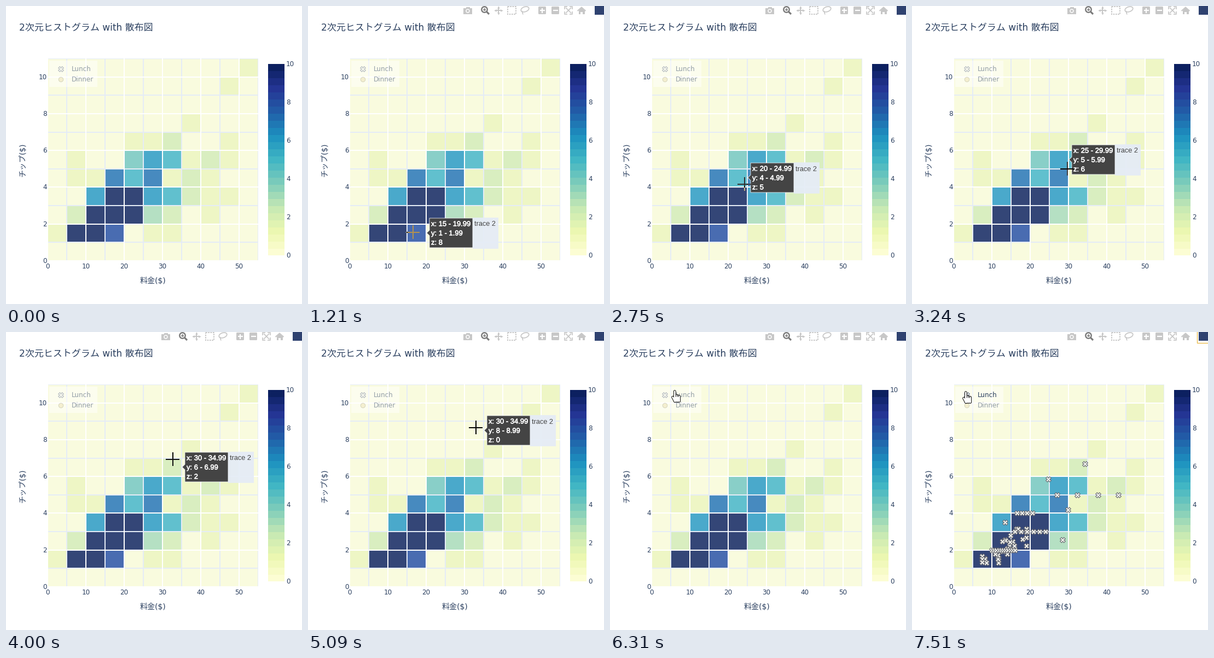
Animation, 541 px wide and 545 px high, one loop 8 s. Source, as a matplotlib script:

```python
import matplotlib.pyplot as plt
import matplotlib.patheffects as pe
import numpy as np
from matplotlib.animation import FuncAnimation
from matplotlib.colors import to_rgb
from matplotlib.patches import Circle, Ellipse, FancyBboxPatch, Polygon, Rectangle

plt.rcParams["font.family"] = ["DejaVu Sans", "Noto Sans CJK JP"]

W, H, PT = 541, 545, 0.72          # stage in pixels, points per pixel
LEFT, BOTTOM, CELL_W, CELL_H, BINS = 76, 466, 35, 370 / 11, 11
LOOP, STEP = 8000, 50
SHOW_BAR, CLICK, SHOW_POINTS = 390, 6980, 7510
INK, PANEL, PALE, DARK = "#2a3f5f", "#e5ecf6", "#c7c7c7", "#7c7c7c"

SCALE = ["#ffffd9", "#edf8b1", "#c7e9b4", "#7fcdbb", "#41b6c4",
         "#1d91c0", "#225ea8", "#253494", "#081d58"]
STOPS = np.array([to_rgb(c) for c in SCALE])

# tip bin: (first bill bin, number of visits in each bin)
VISITS = {
    1: (0, [1, 12, 22, 8, 0, 1, 1]),
    2: (1, [2, 25, 26, 17, 3, 2, 0, 1]),
    3: (2, [6, 22, 17, 6, 5, 2, 1, 1]),
    4: (1, [1, 1, 7, 5, 7, 1, 2, 1]),
    5: (1, [1, 0, 0, 4, 6, 5, 1, 2, 1]),
    6: (4, [1, 1, 2, 0, 0, 1]),
    7: (7, [1]), 9: (9, [1]), 10: (10, [1]),
}
z = np.zeros((BINS, BINS), int)
for row, (col, n) in VISITS.items():
    z[row, col:col + len(n)] = n

# pointer moves: start, end, x, y; it rests in between
START = (293, 528)
MOVES = [
    (390, 860, 188, 423), (1160, 1200, 191, 413), (1490, 2240, 230, 345),
    (2330, 2750, 245, 325), (2780, 3080, 280, 305), (3170, 3570, 303, 250),
    (3860, 4190, 306, 215), (4470, 5060, 306, 174), (5400, 5420, 315, 172),
    (5620, 6100, 166, 140), (6100, 6300, 118, 107), (6440, 6580, 98, 109),
]


def pointer(t):
    pos = np.array(START, float)
    for t0, t1, x, y in MOVES:
        pos += np.clip((t - t0) / (t1 - t0), 0, 1) * (np.array([x, y]) - pos)
    return pos


def lunch_visits():
    """Bills and tips: a noisy 16 % cloud, round tips and a few big bills."""
    rng = np.random.default_rng(4)
    bill = np.clip(rng.normal(14, 3.6, 32), 7.4, 19)
    tip = np.clip(0.16 * bill * rng.normal(1, 0.2, 32), 1.25, 3.6)
    pts = list(zip(bill, tip))
    for t, lo, hi, n in ((2, 10, 16, 11), (3, 16, 24, 6), (4, 16.5, 20.5, 4), (5, 27, 43, 4)):
        pts += [(b, t) for b in np.linspace(lo, hi, n)]
    pts += [(34.3, 6.7), (24.7, 5.85), (29.8, 4.2), (28.4, 2.56), (13.4, 3.5)]
    b, t = np.array(pts).T
    return LEFT + b * CELL_W / 5, BOTTOM - t * CELL_H


def shade(v):
    at = np.linspace(0, 1, len(STOPS))
    return np.stack([np.interp(v, at, STOPS[:, k]) for k in range(3)], axis=-1)


def edge_x(c):
    return LEFT + CELL_W * c


def edge_y(r):
    return int(round(BOTTOM - CELL_H * r))


def paint_base():
    img = np.ones((H, W, 3))
    bg = np.array(to_rgb(PANEL))
    top, low, right = edge_y(BINS), edge_y(0), edge_x(BINS)
    img[top:low, LEFT:right] = bg
    for k in range(0, BINS, 2):
        x, y = edge_x(k), edge_y(k)
        img[top:low, x - 1:x + 1] = 1
        img[y - 1:y + 1, LEFT:right] = 1
    cells = 0.8 * shade(np.clip(z / 10, 0, 1)) + 0.2 * bg
    for r in range(BINS):
        for c in range(BINS):
            img[edge_y(r + 1) + 1:edge_y(r) - 1,
                edge_x(c) + 1:edge_x(c + 1) - 1] = cells[r, c]
    img[100:148, 79:167] = 0.5 * img[100:148, 79:167] + 0.5
    bands = (np.arange(350) * 27 // 350 + 0.5) / 27
    img[106:456, 479:509] = shade(1 - bands)[:, None]
    return img


fig = plt.figure(figsize=(W / 100, H / 100), dpi=100, facecolor="white")
ax = fig.add_axes([0, 0, 1, 1])
ax.axis("off")
base = paint_base()
ax.imshow(base, extent=(0, W, H, 0), aspect="auto", interpolation="nearest")
ax.set(xlim=(0, W), ylim=(H, 0))
ax.autoscale(False)


def label(x, y, s, size=12, color=INK, **kw):
    return ax.text(x, y, s, fontsize=size * PT, color=color, **kw)


def line(xs, ys, color=PALE, lw=2.0, cap="butt", **kw):
    return ax.plot(xs, ys, color=color, lw=lw * PT, solid_capstyle=cap, **kw)[0]


def patch(p):
    return ax.add_patch(p)


def rect(x, y, w, h, color=PALE, **kw):
    return patch(Rectangle((x, y), w, h, fc=color, ec="none", **kw))


def ring(x, y, r, color, lw):
    return patch(Circle((x, y), r, fc="none", ec=color, lw=lw * PT))


def plus(x, y, r, color, lw):
    return [line([x - r, x + r], [y, y], color, lw), line([x, x], [y - r, y + r], color, lw)]


# titles, ticks, legend
label(24, 45, "2次元ヒストグラム with 散布図", 17)
label(268.5, 507, "料金($)", 14, ha="center")
label(31, 281, "チップ($)", 14, rotation=90, ha="center", va="center")
for k in range(6):
    label(edge_x(2 * k), 479.5, str(10 * k), ha="center")
    label(75, BOTTOM - 2 * k * CELL_H + 4, str(2 * k), ha="right")
    label(512, 460 - 70 * k, str(2 * k))

X_STYLE = dict(marker="X", ls="", mfc="#f2f2ee", mew=PT)
lunch_name = label(120, 119, "Lunch", alpha=0.5)
label(120, 138, "Dinner", alpha=0.5)
lunch_key, = ax.plot([100], [114.5], alpha=0.5, ms=9.5 * PT, mec="#66738a", **X_STYLE)
ax.plot([100], [133.5], "o", ms=8.5 * PT, mfc="#eee3b4", mec="#b4b49c", mew=PT, alpha=0.5)
points, = ax.plot(*lunch_visits(), ms=9.2 * PT, mec="#606269", **X_STYLE)


def toolbar(y=8):
    # camera
    parts = [rect(284, 4, 16, 10.5), rect(288.5, 2, 7, 3), ring(292, 9, 3, "white", 1.5)]
    # magnifier
    parts += [ring(322.5, 6.5, 5.2, DARK, 2.4), line([326, 331], [10, 15], DARK, 3.2)]
    parts += plus(322.5, 6.5, 2.7, DARK, 1.6)
    # pan
    parts += plus(348, y, 6, PALE, 2)
    for dx, dy, m in ((1, 0, ">"), (-1, 0, "<"), (0, 1, "v"), (0, -1, "^")):
        parts.append(line([348 + 6 * dx], [y + 6 * dy], marker=m, ms=4.5 * PT, mew=0))
    # box select, lasso
    parts.append(patch(Rectangle((365, 1), 14.5, 14, fc="none", ec=PALE, lw=2 * PT,
                                 ls=(0, (1.3, 0.85)))))
    parts.append(patch(Ellipse((396.5, 6), 15, 9, angle=-18, fc="none", ec=PALE,
                               lw=1.7 * PT)))
    parts.append(line([391, 393], [9, 15.5], lw=1.7))
    # zoom in and out
    for x in (428, 452):
        parts.append(patch(FancyBboxPatch((x - 6, y - 6), 12, 12, fc=PALE, ec="none",
                                          boxstyle="round,pad=1,rounding_size=1.5")))
    parts += plus(428, y, 4.5, "white", 2.2)
    parts.append(line([447.5, 456.5], [y, y], "white", 2.2))
    # autoscale
    for sx in (-1, 1):
        parts.append(line([476 - 5 * sx, 476 + 5 * sx], [y - 5, y + 5], lw=1.7))
        for sy in (-1, 1):
            cx, cy = 476 + 7 * sx, y + 7 * sy
            parts.append(line([cx - 5 * sx, cx, cx], [cy, cy, cy - 5 * sy], lw=1.7))
    # home
    parts += [line([492.5, 500, 507.5], [9, 2.5, 9], lw=2), rect(494.5, 8, 11, 7),
              rect(498.3, 10.5, 3.4, 4.5, "white"),
              patch(Polygon([(494.5, 8.2), (500, 3.5), (505.5, 8.2)], fc=PALE))]
    return parts + [rect(524, 0, 17, 16, "#2f4270")]


bar = toolbar()
focus = patch(Rectangle((520.5, -2), 25, 21.5, fc="none", ec="#e8b53a", lw=1.2 * PT))

# hover label
ARIAL = dict(family="Liberation Sans")
side_box = rect(0, 0, 47, 57, PANEL, alpha=0.95, zorder=6)
side_text = label(0, 0, "trace 2", 12.8, "#444444", zorder=7, **ARIAL)
tip_box = patch(Polygon([(0, 0)] * 3, fc="#444444", ec="#f2f5fa", lw=0.8 * PT, zorder=7))
bold = [pe.withStroke(linewidth=0.35, foreground="white")]
tip_text = [label(0, 0, "", 13, "white", zorder=8, path_effects=bold, **ARIAL)
            for _ in range(3)]
hover = [side_box, side_text, tip_box, *tip_text]


def hand_strokes():
    """Thumb and four fingers, and the gaps between them, as broken lines."""
    gap = [(np.nan, np.nan)]
    body = [(2.6, 13.2), (6.6, 20.5)] + gap
    creases = []
    for k in range(4):
        x, top = 6.3 + 2.8 * k, 2.5 if k == 0 else 8.8 + 0.9 * k
        body += [(x, top), (x, 20.5)] + gap
        creases += [(x + 1.4, 8 + k), (x + 1.4, 12)] + gap if k < 3 else []
    return np.array(body), np.array(creases)


body, creases = hand_strokes()
hand = [(line([], [], "black", 4.8, "round", zorder=10), body),
        (line([], [], "white", 2.9, "round", zorder=11), body),
        (line([], [], "black", 1, zorder=12), creases)]
hand_parts = [ln for ln, _ in hand]
ARROW = np.array([(0, 0), (0, 16), (4, 12.5), (6.5, 18), (8.8, 17), (6.4, 11.5), (11, 11)])
arrow = patch(Polygon(ARROW, fc="white", ec="black", lw=PT, zorder=10))
ARM = 12
mask = np.zeros((2 * ARM + 1, 2 * ARM + 1))
mask[ARM:ARM + 2] = mask[:, ARM:ARM + 2] = 1
cross = ax.imshow(np.zeros(mask.shape + (4,)), extent=(0, 1, 1, 0), aspect="auto",
                  interpolation="nearest", zorder=9)


def show(items, on):
    for it in items:
        it.set_visible(on)


def place_hover(x, y):
    c = min(int((x - LEFT) // CELL_W), BINS - 1)
    r = min(int((BOTTOM - y) // CELL_H), BINS - 1)
    tip, cy = edge_x(c + 1) + 1, int(BOTTOM - (r + 0.5) * CELL_H)
    x0, x1 = tip + 5, tip + 84
    tip_box.set_xy([(tip, cy), (x0, cy - 5), (x0, cy - 27), (x1, cy - 27),
                    (x1, cy + 27), (x0, cy + 27), (x0, cy + 5)])
    side_box.set_xy((x1, cy - 28))
    side_text.set_position((x1 + 3, cy - 12.5))
    rows = (f"x: {5 * c} - {5 * c + 4.99:.2f}", f"y: {r} - {r + .99:.2f}", f"z: {z[r, c]}")
    for k, (t, s) in enumerate(zip(tip_text, rows)):
        t.set_text(s)
        t.set_position((x0 + 3, cy - 12.5 + 17 * k))


def place_cross(x, y):
    x, y = int(round(x)), int(round(y))
    under = base[y - ARM:y + ARM + 1, x - ARM:x + ARM + 1]
    inv = 1 - under
    # inverted on dark cells, near black on light ones
    light = under.mean(axis=2, keepdims=True) > 0.5
    ink = np.where(light, inv.min(axis=2, keepdims=True), inv)
    cross.set_data(np.dstack([ink, mask]))
    cross.set_extent((x - ARM, x + ARM + 1, y + ARM + 1, y - ARM))


def draw(i):
    t = i * STEP + STEP / 2
    x, y = pointer(t)
    live = t >= SHOW_BAR
    on_legend = live and x < 167 and y < 148
    on_plot = live and not on_legend and y < BOTTOM
    show(bar, live)
    show([focus], t >= CLICK)
    show(hover + [cross], on_plot)
    show(hand_parts, on_legend)
    show([arrow], live and y >= BOTTOM)
    if on_plot:
        place_hover(x, y)
        place_cross(x, y)
    elif on_legend:
        for ln, pts in hand:
            ln.set_data(*(pts + (x - 6, y - 1)).T)
    else:
        arrow.set_xy(ARROW + (x, y))
    picked = t >= SHOW_POINTS
    points.set_visible(picked)
    for it in (lunch_name, lunch_key):
        it.set_alpha(1 if picked else 0.5)
    return []


anim = FuncAnimation(fig, draw, frames=LOOP // STEP, interval=STEP, repeat=True,
                     repeat_delay=0, blit=False)
plt.show()
```
